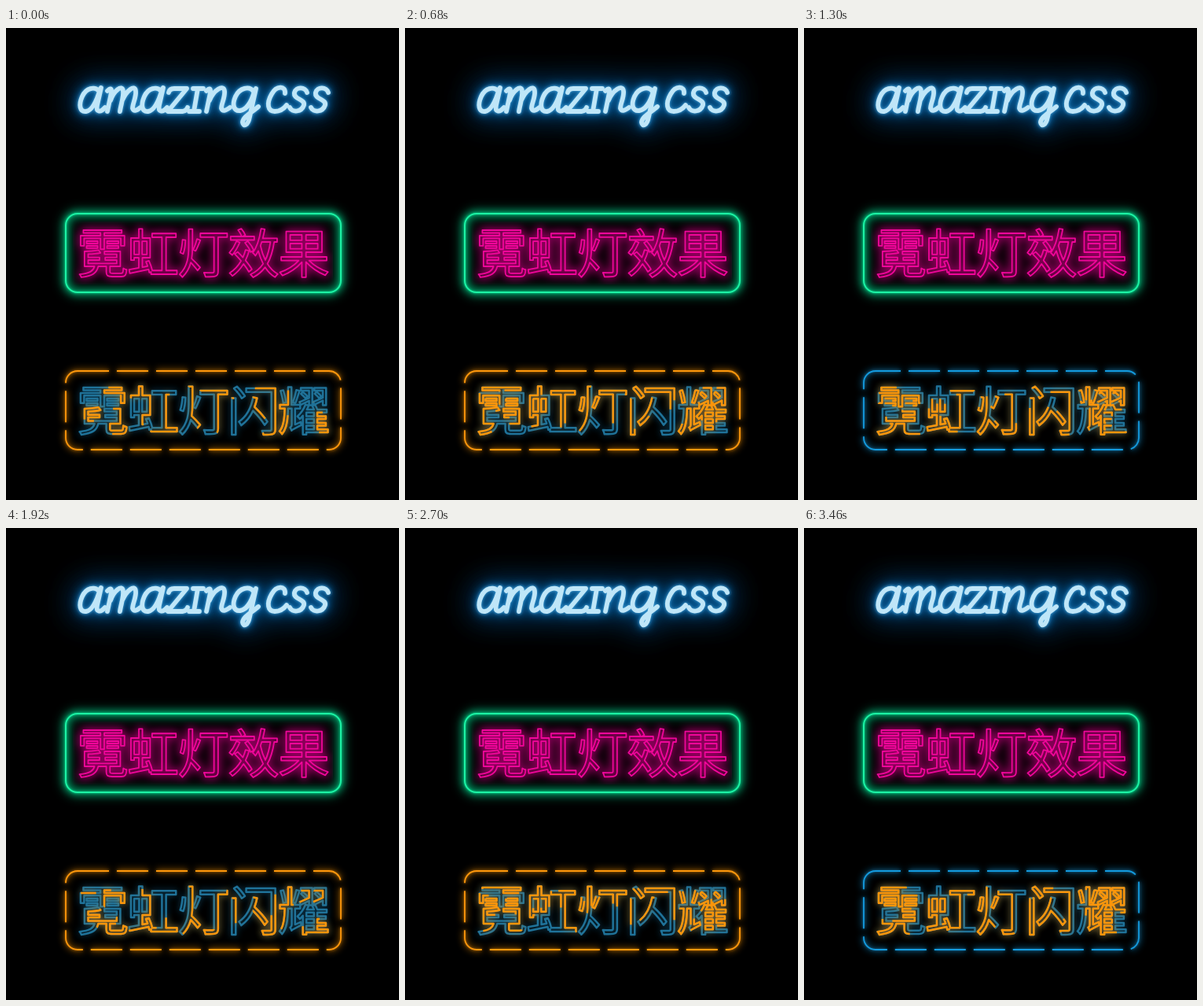
These frames come from a looping animation (500 px wide and 600 px high, 3.54 s). An HTML page:

```html
<!DOCTYPE html>
<html lang="zh-CN">
<head>
<meta charset="utf-8">
<title>Neon</title>
<style>
html, body { margin: 0; width: 100%; height: 100%; overflow: hidden; background: #000; }
svg { display: block; width: 500px; height: 600px; }
text {
  font: 300 66px "Noto Sans CJK SC", "Noto Sans CJK", sans-serif;
  letter-spacing: -2px;
  fill: none;
  stroke-linejoin: round;
}
rect, path { fill: none; stroke-linecap: round; stroke-linejoin: round; }
#border rect { stroke-linecap: butt; }
</style>
</head>
<body>
<svg viewBox="0 0 500 600" xmlns="http://www.w3.org/2000/svg">
  <defs>
    <filter id="b1" filterUnits="userSpaceOnUse" x="0" y="0" width="500" height="600"><feGaussianBlur stdDeviation="1.6"/></filter>
    <filter id="b4" filterUnits="userSpaceOnUse" x="0" y="0" width="500" height="600"><feGaussianBlur stdDeviation="4"/></filter>
    <filter id="b7" filterUnits="userSpaceOnUse" x="0" y="0" width="500" height="600"><feGaussianBlur stdDeviation="7"/></filter>
    <filter id="b18" filterUnits="userSpaceOnUse" x="0" y="0" width="500" height="600"><feGaussianBlur stdDeviation="18"/></filter>
    <clipPath id="panel"><rect x="85" y="246" width="331" height="80"/></clipPath>
    <path id="a" d="M118 80C113 74 102 76 97 87C92 98 94 107 102 106C109 105 115 94 120 77M121 76L116 98C114 107 120 108 126 101"/>
    <path id="s" d="M383 82C381 75 369 74 367 82C365 91 381 90 379 98C376 107 364 108 361 101"/>
    <g id="script">
      <use href="#a"/>
      <path d="M129 80Q135 74 134 82L129 106M133 92C137 80 148 71 149 80C150 87 146 98 145 106M148 92C153 80 164 71 165 80C166 88 161 96 161 102Q163 108 171 101"/>
      <use href="#a" x="79"/>
      <path d="M207 82Q208 77 214 77L230 77L206 106L225 106Q230 105 231 101"/>
      <path d="M238 77H251M244 77L239 106M233 106H246"/>
      <path d="M255 80Q261 74 260 82L255 106M259 92C264 79 277 71 278 80C279 88 274 96 274 102Q276 108 285 101"/>
      <path d="M315 81C310 73 297 76 292 87C287 98 290 106 298 105C305 104 312 96 316 80M318 77L310 113C308 124 302 126 301 120C301 113 313 107 321 100"/>
      <path d="M355 83C356 73 344 73 338 84C331 96 333 106 342 106C349 106 354 102 357 98"/>
      <use href="#s"/>
      <use href="#s" x="27"/>
    </g>
    <text id="effect" x="90" y="310.5">霓虹灯效果</text>
    <text id="shine" x="90" y="510.5">霓虹灯闪耀</text>
    <rect id="frame" x="76" y="236" width="350" height="100" rx="15"/>
  </defs>

  <g role="img" aria-label="Amazing CSS">
    <use href="#script" stroke="#004c84" stroke-width="22" opacity=".75" filter="url(#b18)"/>
    <use href="#script" stroke="#0062a8" stroke-width="9" opacity=".7" filter="url(#b7)"/>
    <use href="#script" stroke="#1c80c4" stroke-width="7" opacity=".65" filter="url(#b4)"/>
    <use href="#script" stroke="#4aa6dc" stroke-width="7" opacity=".75" filter="url(#b1)"/>
    <use href="#script" stroke="#bfe6f8" stroke-width="5.8"/>
  </g>

  <g>
    <use href="#frame" stroke="#00a870" stroke-width="11" opacity=".5" filter="url(#b7)"/>
    <use href="#frame" stroke="#00c884" stroke-width="6" opacity=".7" filter="url(#b4)"/>
    <use href="#frame" stroke="#00e090" stroke-width="3" opacity=".7" filter="url(#b1)"/>
    <use href="#frame" stroke="#1cf2a4" stroke-width="2"/>
    <g clip-path="url(#panel)">
      <use href="#effect" stroke="#d8008a" stroke-width="7" opacity=".5" filter="url(#b7)"/>
      <use href="#effect" stroke="#e00090" stroke-width="3" opacity=".4" filter="url(#b4)"/>
    </g>
    <use href="#effect" stroke="#f0069a" stroke-width="1.8"/>
  </g>

  <g id="border">
    <rect class="edge" stroke-width="5" opacity=".5" filter="url(#b4)"/>
    <rect class="edge" stroke-width="3" opacity=".4" filter="url(#b1)"/>
    <rect class="edge" stroke-width="1.8"/>
  </g>
  <use href="#shine" stroke="#14648c" stroke-width="4" opacity=".45" filter="url(#b4)"/>
  <use href="#shine" stroke="#1f7299" stroke-width="2.5"/>
  <g id="sparks" stroke="#fb950a" stroke-dasharray="100 100">
    <use href="#shine" stroke-width="4" opacity=".45" filter="url(#b4)"/>
    <use href="#shine" stroke-width="2.5"/>
  </g>
</svg>
<script>
const LOOP = 3540;
const RUN = 2310;       // time for one dash period
const PERIOD = 200;
const FLIP = 1000;      // border swaps colour at this interval
const FIRST_FLIP = 840;
const border = document.getElementById('border');
const sparks = document.getElementById('sparks');

function setAll(el, attrs) {
  for (const key in attrs) el.setAttribute(key, attrs[key]);
}

for (const edge of document.querySelectorAll('.edge')) {
  setAll(edge, { x: 76, y: 436, width: 350, height: 100, rx: 15, 'stroke-dasharray': '40 10' });
}

function draw(t) {
  const blue = Math.floor((t - FIRST_FLIP + FLIP) / FLIP) % 2 === 1;
  setAll(border, {
    stroke: blue ? '#149bdf' : '#ff980c',
    'stroke-dashoffset': blue ? 8 : 0
  });
  sparks.setAttribute('stroke-dashoffset', (-PERIOD * (t / RUN + 0.5)).toFixed(2));
}

const start = performance.now();
function tick() {
  draw((performance.now() - start) % LOOP);
  requestAnimationFrame(tick);
}
draw(0);
requestAnimationFrame(tick);
</script>
</body>
</html>
```
